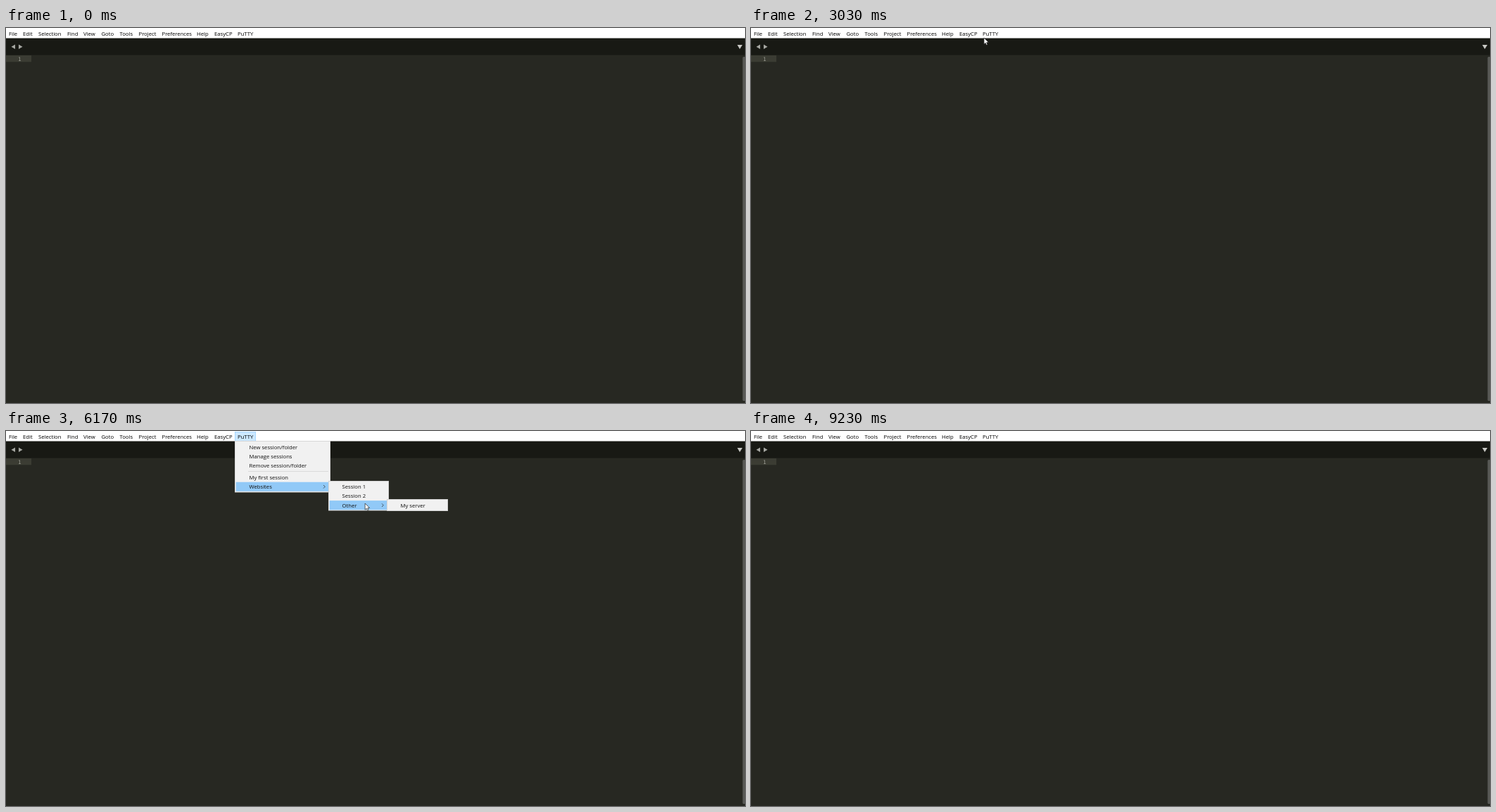
Animation of 1050 by 534 pixels, one loop 9360 ms. Source, as an HTML page with a canvas:

```html
<!DOCTYPE html>
<html lang="en">
<head>
<meta charset="utf-8">
<title>QuickPuTTY usage</title>
<style>
  html, body { margin: 0; width: 100%; height: 100%; overflow: hidden; background: #272822; }
  canvas { display: block; }
</style>
</head>
<body>
<canvas id="stage" width="1050" height="534"></canvas>
<script>
const ctx = document.getElementById('stage').getContext('2d');
const LOOP = 9360;
const UI = '"Open Sans", "Noto Sans", sans-serif';

const MENU_BAR = [['File', 4], ['Edit', 24], ['Selection', 46], ['Find', 87], ['View', 110],
  ['Goto', 135.5], ['Tools', 161.5], ['Project', 188.5], ['Preferences', 221.5],
  ['Help', 271], ['EasyCP', 296], ['PuTTY', 329]];

const MAIN = { x: 325, y: 14, w: 136, h: 73.5, textX: 345.5, items: [
  ['New session/folder', 22.7], ['Manage sessions', 36], ['Remove session/folder', 49.2],
  ['My first session', 66], ['Websites', 79.3, true]] };
const SITES = { x: 458, y: 71, w: 86, h: 42.5, textX: 477.5, items: [
  ['Session 1', 79.3], ['Session 2', 92.5], ['Other', 105.7, true]] };
const OTHER = { x: 541, y: 97, w: 87, h: 17, textX: 560.5, items: [['My server', 105.7]] };

// Pointer path: time, x, y
const PATH = [[2090, 226, 106], [2300, 241, 93], [2700, 309, 34], [3030, 331, 14],
  [3250, 336, 7], [3480, 338, 7], [3800, 358, 22], [4050, 368, 36], [4200, 375, 50],
  [4370, 380, 66], [4650, 392, 78], [4900, 468, 78], [5300, 490, 80], [5600, 500, 90],
  [5900, 506, 97], [6170, 510, 103], [6500, 552, 104], [6830, 590, 104], [7470, 601, 102]];

const clamp = v => Math.max(0, Math.min(1, v));
const ramp = (t, from, to) => clamp((t - from) / (to - from));

function rect(x, y, w, h, color) {
  ctx.fillStyle = color;
  ctx.fillRect(x, y, w, h);
}

function text(str, x, y, color, font = `7.7px ${UI}`) {
  ctx.font = font;
  ctx.fillStyle = color;
  ctx.fillText(str, x, y);
}

function trace(points, closed) {
  ctx.beginPath();
  points.forEach(([x, y]) => ctx.lineTo(x, y));
  if (closed) ctx.closePath();
}

function polygon(points, color) {
  trace(points, true);
  ctx.fillStyle = color;
  ctx.fill();
}

function line(points, color, width = 1) {
  trace(points);
  ctx.strokeStyle = color;
  ctx.lineWidth = width;
  ctx.stroke();
}

function faded(alpha, draw) {
  if (alpha <= 0) return;
  ctx.save();
  ctx.globalAlpha = alpha;
  draw();
  ctx.restore();
}

function pointerAt(t) {
  const next = PATH.findIndex(p => p[0] > t);
  if (next < 0) return PATH[PATH.length - 1].slice(1);
  if (next === 0) return PATH[0].slice(1);
  const [t0, x0, y0] = PATH[next - 1], [t1, x1, y1] = PATH[next];
  const k = (t - t0) / (t1 - t0);
  return [x0 + (x1 - x0) * k, y0 + (y1 - y0) * k];
}

function drawEditor(menuOpen, inactive) {
  rect(0, 0, 1050, 534, '#272822');
  rect(0, 14, 1050, 24.5, '#181914');
  rect(0, 0, 1050, 14.5, '#fff');
  if (menuOpen) {
    rect(325, 1, 30, 13.5, '#99d1ff');
    rect(325.7, 1.7, 28.6, 12.8, '#cce8ff');
  }
  const shade = Math.round(110 * inactive);
  MENU_BAR.forEach(([label, x]) => text(label, x, 10.8, `rgb(${shade},${shade},${shade})`));

  polygon([[7.5, 26.7], [13, 23.4], [13, 30]], '#a6a7a2');
  polygon([[23.5, 26.7], [18, 23.4], [18, 30]], '#a6a7a2');
  polygon([[1039, 24], [1046.3, 24], [1042.6, 30]], '#c8c8c4');
  rect(0, 39, 36, 9.3, '#3b3c33');
  text('1', 17, 46.6, '#9a9b92', '7.6px "DejaVu Sans Mono", monospace');
  ctx.beginPath();
  ctx.roundRect(1046.6, 41, 4, 490, 1.5);
  ctx.fillStyle = '#585955';
  ctx.fill();
}

function drawTitle() {
  ctx.textAlign = 'center';
  ctx.letterSpacing = '-1.5px';
  const font = `bold 66px ${UI}`;
  text('QuickPuTTY', 525, 237, '#fff', font);
  text('Usage', 525, 333, '#349fee', font);
}

function drawMenu({ x, y, w, h, textX, items }, isActive) {
  rect(x, y, w, h, '#cfcfcf');
  rect(x + .8, y + .8, w - 1.6, h - 1.6, '#f1f1f1');
  items.forEach(([label, mid, hasSub], i) => {
    if (isActive(i)) rect(x + 1.7, mid - 6.6, w - 3.6, 13.2, '#91c9f7');
    text(label, textX, mid + 2.8, '#111');
    if (hasSub) {
      const ax = x + w - 10;
      line([[ax, mid - 2.3], [ax + 2.3, mid], [ax, mid + 2.3]], '#333', .8);
    }
  });
}

function drawMenus(t, [px, py]) {
  const hover = menu => menu.items.findIndex(([, mid]) =>
    px > menu.x && px < menu.x + menu.w && Math.abs(py - mid) <= 6.7);
  const sitesOpen = t >= 4750, otherOpen = t >= 5960;
  const inOther = otherOpen && px > OTHER.x;
  const inSites = sitesOpen && px > SITES.x;
  const mainRow = inSites ? 4 : hover(MAIN);
  const sitesRow = inOther ? 2 : inSites ? hover(SITES) : -1;

  drawMenu(MAIN, i => i === mainRow);
  line([[344, 57.5], [458, 57.5]], '#d4d4d4', .8);
  if (sitesOpen) drawMenu(SITES, i => i === sitesRow);
  if (otherOpen) drawMenu(OTHER, () => inOther);
}

function drawArrow([x, y]) {
  ctx.save();
  ctx.translate(x, y);
  trace([[0, 0], [0, 9.2], [2.1, 7.3], [3.5, 10.4], [5, 9.7], [3.7, 6.7], [6.5, 6.5]], true);
  ctx.fillStyle = '#fff';
  ctx.fill();
  ctx.strokeStyle = '#222';
  ctx.lineWidth = .7;
  ctx.stroke();
  ctx.restore();
}

function drawTextCursor() {
  ctx.beginPath();
  ctx.arc(602.5, 105, 8.5, 0, 7);
  ctx.strokeStyle = '#33342f';
  ctx.lineWidth = 1;
  ctx.stroke();
  line([[604, 101], [604, 109]], '#ddd');
  line([[602, 101], [606, 101]], '#ddd');
  line([[602, 109], [606, 109]], '#ddd');
}

function drawTerminal() {
  ctx.save();
  ctx.shadowColor = 'rgba(0,0,0,.45)';
  ctx.shadowBlur = 5;
  rect(42.5, 22.5, 447, 242.5, '#f4f4f4');
  ctx.restore();
  rect(42.5, 22.5, 447, 19.5, '#fcfcfc');
  rect(43, 42, 435, 222.5, '#000');
  rect(48, 27, 10, 10, '#777');

  const smudge = ctx.createLinearGradient(62, 0, 115, 0);
  ['#cfcfcf', '#dadada', '#c8c8c8', '#d6d6d6', '#cacaca', '#dedede']
    .forEach((color, i) => smudge.addColorStop(i / 5, color));
  rect(62, 28, 52.5, 9, smudge);
  text('- PuTTY', 116, 34.9, '#000', `8px ${UI}`);

  line([[406, 32], [412.5, 32]], '#111');
  ctx.strokeRect(437.7, 29, 6.2, 6);
  line([[470, 29], [476, 35]], '#111');
  line([[476, 29], [470, 35]], '#111');
  line([[481.5, 49], [483.8, 46.6], [486.1, 49]], '#777', .9);
  line([[481.5, 258], [483.8, 260.4], [486.1, 258]], '#777', .9);
  rect(43, 42.7, 5.5, 9.5, '#0f0');
}

function draw(t) {
  const menuOpen = t >= 3480 && t < 7860;
  const terminal = Math.min(ramp(t, 7860, 8240), 1 - ramp(t, 8800, 9220));
  const pointer = pointerAt(t);

  drawEditor(menuOpen, terminal);
  faded(Math.min(ramp(t, 0, 970), 1 - ramp(t, 1400, 1832)), drawTitle);
  if (menuOpen) drawMenus(t, pointer);
  faded(terminal, drawTerminal);
  if (t < 7860) faded(ramp(t, 2085, 2300), () => drawArrow(pointer));
  else faded(1 - ramp(t, 8150, 8600), drawTextCursor);
}

function tick() {
  draw(performance.now() % LOOP);
  requestAnimationFrame(tick);
}
tick();
</script>
</body>
</html>
```
